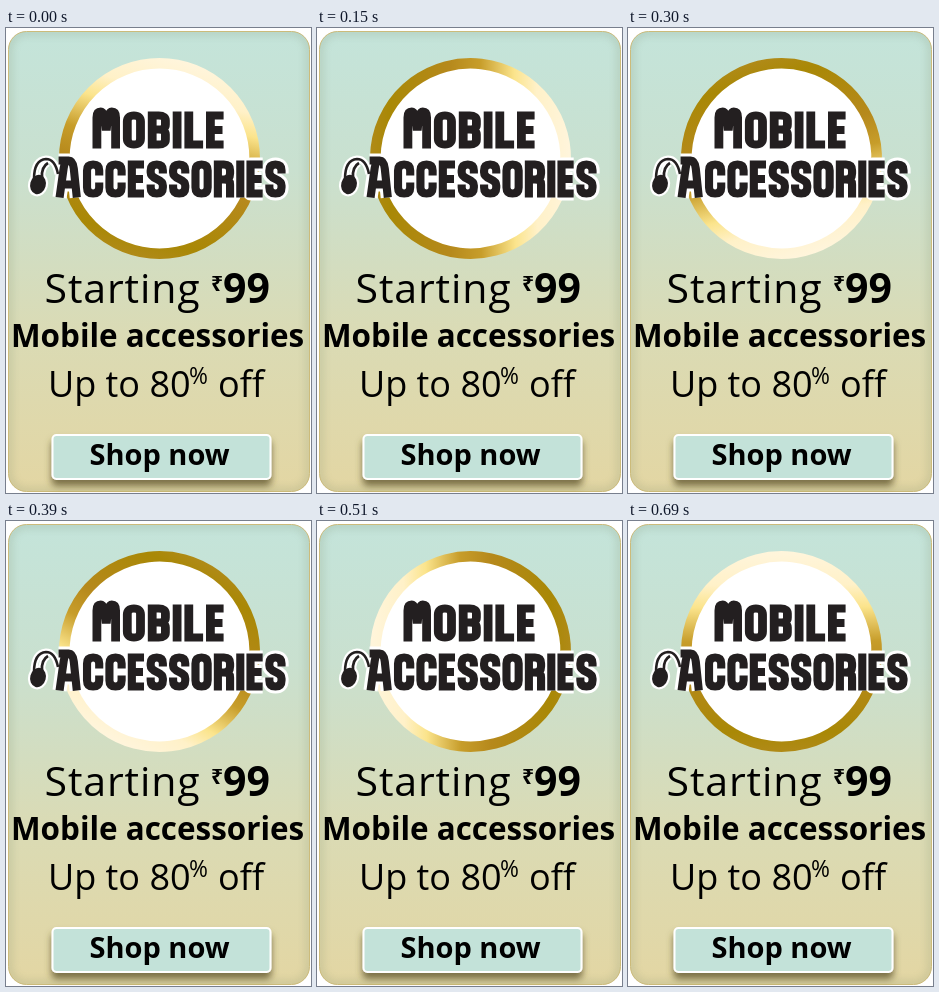
An HTML page that plays this animation: 305x465 px, repeating every 720 ms.

```html
<!DOCTYPE html>
<html lang="en">
<head>
<meta charset="utf-8">
<title>Mobile accessories</title>
<style>
  html, body { margin: 0; width: 100%; height: 100%; overflow: hidden; background: #fff; }
  svg { display: block; width: 305px; height: 465px; }
  text { font-family: "Open Sans", "Noto Sans", sans-serif; fill: #000; }
  .bold { font-weight: 700; }
  .halo { stroke: #fff; stroke-width: 14; stroke-linejoin: round; }
  .ink { stroke: #231f20; stroke-width: 8; }
  .edge { fill: none; stroke: #7d8c6c; stroke-width: 5; opacity: .35; filter: blur(4px); }
</style>
</head>
<body>
<svg viewBox="0 0 305 465">
  <defs>
    <linearGradient id="card" x2="0" y2="1">
      <stop offset="0" stop-color="#c4e4da"/>
      <stop offset=".3" stop-color="#c9e0cf"/>
      <stop offset=".65" stop-color="#dadbb5"/>
      <stop offset="1" stop-color="#e3d6a3"/>
    </linearGradient>
    <linearGradient id="gold" gradientUnits="userSpaceOnUse" x1="179" y1="33" x2="128" y2="228">
      <stop offset="0" stop-color="#fff5dc"/>
      <stop offset=".17" stop-color="#fff1c8"/>
      <stop offset=".28" stop-color="#fbe48c"/>
      <stop offset=".45" stop-color="#c79d2a"/>
      <stop offset=".6" stop-color="#b6891c"/>
      <stop offset=".9" stop-color="#a98806"/>
      <stop offset="1" stop-color="#b08a18"/>
    </linearGradient>
    <filter id="shadow" x="-10%" y="-20%" width="120%" height="160%">
      <feDropShadow dx="0" dy="6" stdDeviation="3.5" flood-color="#5a5026" flood-opacity=".75"/>
    </filter>
    <clipPath id="inside"><rect x="2.5" y="3.5" width="301" height="460" rx="18"/></clipPath>
    <g id="letters" fill="none"></g>
    <g id="headphones">
      <ellipse cx="32" cy="156.5" rx="6.5" ry="8.5" transform="rotate(15 32 156.5)"/>
      <path d="M28 151Q28 132 40 131Q49 131 52 146M36 150Q35 139 42 135" fill="none"/>
    </g>
  </defs>

  <rect x="2.5" y="3.5" width="301" height="460" rx="18" fill="url(#card)" stroke="#d3bf7c"/>
  <g clip-path="url(#inside)"><rect class="edge" x="2.5" y="3.5" width="301" height="460" rx="18"/></g>
  <circle cx="153.5" cy="130.5" r="92" fill="#fff"/>
  <circle id="ring" cx="153.5" cy="130.5" r="95.2" fill="none" stroke="url(#gold)" stroke-width="10.6"/>

  <g role="img" aria-label="Mobile Accessories">
    <use href="#headphones" fill="#fff" stroke="#fff" stroke-width="7"/>
    <use href="#letters" class="halo"/>
    <use href="#headphones" fill="#231f20" stroke="#231f20" stroke-width="2.6"/>
    <use href="#letters" class="ink"/>
  </g>

  <text x="38.5" y="275" font-size="41" letter-spacing=".9">Starting</text>
  <text x="205" y="263" font-size="21" font-weight="600">₹</text>
  <text x="217" y="275" font-size="41" class="bold">99</text>
  <text x="5" y="319" font-size="31.4" class="bold">Mobile accessories</text>
  <text x="42" y="368.5" font-size="36">Up to 80</text>
  <text x="183" y="356" font-size="23">%</text>
  <text x="212" y="368.5" font-size="36">off</text>

  <rect x="46.5" y="407" width="218" height="44" rx="4" fill="#c3e2d9" stroke="#fff" stroke-width="2" filter="url(#shadow)"/>
  <text x="83.5" y="437" font-size="29" class="bold">Shop now</text>
</svg>
<script>
  // Letter centre lines
  const glyphs = {
    M: "M0 37V6Q0 0 3.5 0Q7 0 8.5 19Q10 0 13.5 0Q17 0 17 6V37",
    A: "M0 37L4 8Q5 0 9 0Q13 0 14 8L17 37M2 24H16M-1 0H9",
    O: "M0 6Q0 0 6 0Q12 0 12 6V23Q12 29 6 29Q0 29 0 23Z",
    B: "M0 29V0H6Q12 0 12 5V9Q12 14 6 14H0M6 14Q12 14 12 19V24Q12 29 6 29H-4",
    I: "M0 -4V33",
    L: "M0 -4V29H13",
    E: "M12 0H0V29H12M0 14.5H11",
    C: "M12 11V6Q12 0 6 0Q0 0 0 6V23Q0 29 6 29Q12 29 12 23V18",
    S: "M12 9V6Q12 0 6 0Q0 0 0 6V8Q0 12 6 14.5Q12 17 12 21V23Q12 29 6 29Q0 29 0 23V20",
    R: "M0 33V0H6Q12 0 12 6V9Q12 15 6 15H0M6 15Q12 15 12 20V33"
  };
  const widths = { M: 25, A: 25, I: 8, L: 17, E: 16.5 };

  function word(text, x, y, gap, scale) {
    [...text].forEach((char, i) => {
      const path = document.createElementNS("http://www.w3.org/2000/svg", "path");
      const top = i ? y : y - 4;
      path.setAttribute("d", glyphs[char]);
      path.setAttribute("transform", `translate(${x + 4 * scale} ${top}) scale(${scale} 1)`);
      document.getElementById("letters").append(path);
      x += (widths[char] || 20) * scale + gap;
    });
  }

  word("MOBILE", 86.5, 87.5, 2.9, 1.1);
  word("ACCESSORIES", 49.5, 136.5, 2.1, 1.015);

  const ring = document.getElementById("ring");
  function draw() {
    const step = Math.floor(performance.now() % 720 / 30);
    ring.setAttribute("transform", `rotate(${step * 15} 153.5 130.5)`);
    requestAnimationFrame(draw);
  }
  draw();
</script>
</body>
</html>
```
